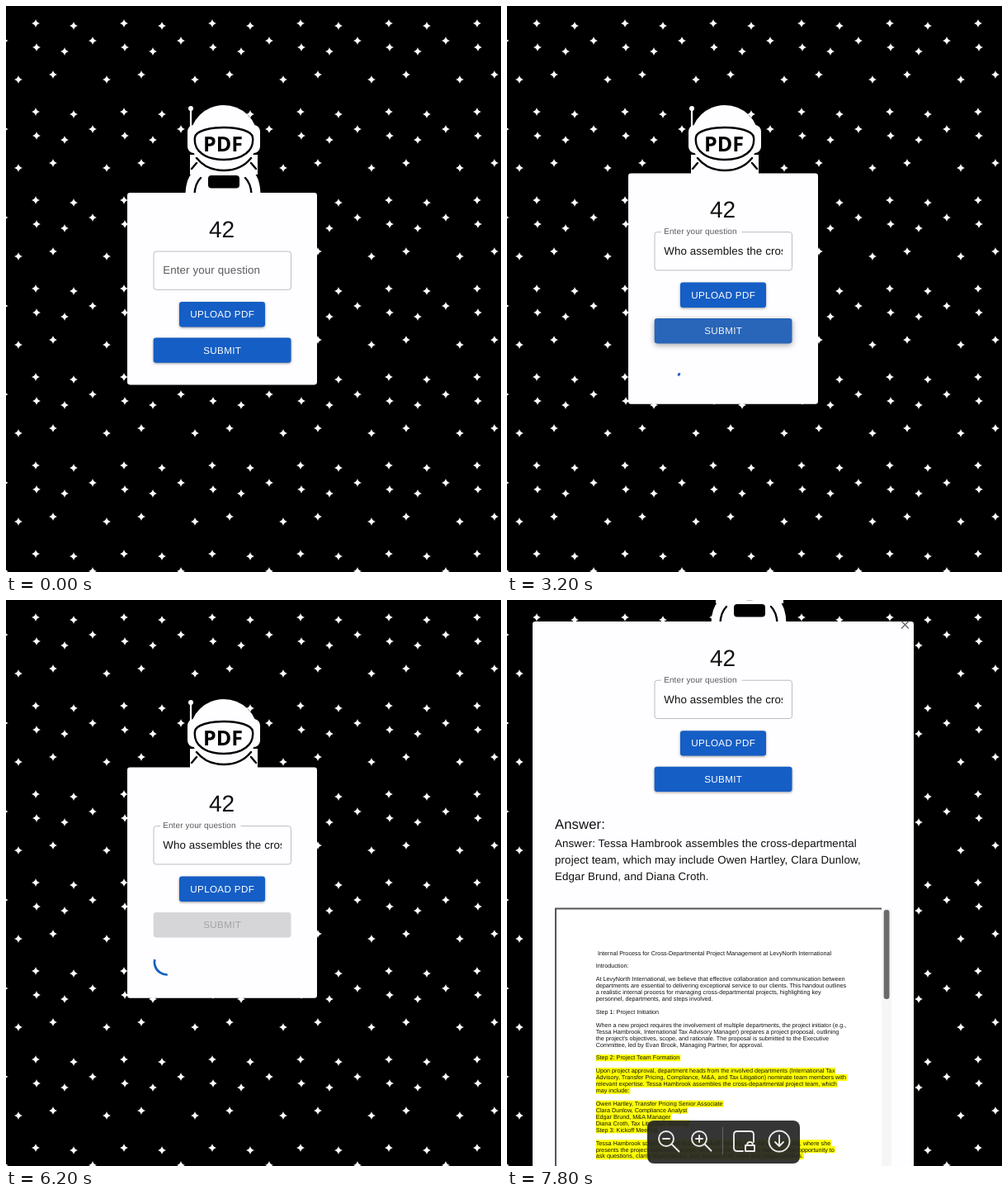
An HTML page that plays this animation: 600x685 px, repeating every 8 s.

```html
<!DOCTYPE html>
<html lang="en">
<head>
<meta charset="utf-8">
<title>42</title>
<style>
  html, body { margin: 0; width: 100%; height: 100%; overflow: hidden; background: #000; }
  svg { display: block; width: 600px; height: 685px; }
  text { font-family: "Liberation Sans", Arial, sans-serif; white-space: pre; text-rendering: geometricPrecision; }
  .body { font-size: 13.33px; letter-spacing: .125px; fill: #111; }
  .button { font-size: 11.67px; letter-spacing: .333px; text-anchor: middle; fill: #fff; }
  .doc { font-size: 7.24px; fill: #111; }
  .line { fill: none; stroke: #000; stroke-width: 2.4; stroke-linecap: round; }
  #upload { filter: drop-shadow(0 1.5px 1.5px rgba(0,0,0,.4)); }
  #hud .icon { fill: none; stroke: #e8e8e8; stroke-width: 1.9; stroke-linecap: round; stroke-linejoin: round; }
</style>
</head>
<body>
<svg viewBox="0 0 600 685">
  <defs><clipPath id="inputClip"><rect x="189.5" y="305" width="144.5" height="30"/></clipPath></defs>
  <rect width="600" height="685"/>
  <path id="stars" fill="#fff"/>

  <g id="astronaut" fill="#fefdff">
    <path d="M223 180h82v24h-82z"/>
    <path d="M217.5 228Q218 206 230 198L240 190H287L297 198Q308 206 308.500 228Z"/>
    <path class="line" d="M231 190L225 197M297 190L303 197" stroke-width="2"/>
    <path class="line" d="M236 208Q229 215 228.500 228M290 208Q297 215 297.500 228"/>
    <rect x="245" y="205" width="38" height="15.500" rx="4" fill="#000"/>
    <path d="M224 124V152" stroke="#fefdff" stroke-width="2.200"/>
    <circle cx="224" cy="124" r="3"/>
    <rect x="220" y="144" width="88" height="34" rx="8"/>
    <ellipse cx="264" cy="160" rx="41" ry="40"/>
    <path class="line" d="M231 184Q243 199 264 199T297 184"/>
    <path class="line" d="M229 159C231 143 297 143 299 159C301 175 287 186 264 186S227 175 229 159Z"/>
    <text x="263" y="175.500" font-size="25" font-weight="700" text-anchor="middle" fill="#000" style="font-family:'Open Sans','Noto Sans',sans-serif">PDF</text>
  </g>

  <rect id="card" rx="3.300" fill="#fefdff"/>

  <g id="form">
    <text x="261.500" y="279.500" font-size="28" text-anchor="middle" fill="#111">42</text>
    <rect id="outline" x="179" y="297" width="166.500" height="46.300" rx="3.300" fill="none"/>
    <rect id="notch" x="187" y="294" height="5" fill="#fefdff"/>
    <text id="label" class="body">Enter your question</text>
    <g clip-path="url(#inputClip)"><text id="value" class="body" y="324.400">Who assembles the cross-departmental project team?</text></g>
    <rect id="caret" y="312" width=".9" height="16" fill="#111"/>
    <path id="ibeam" d="M264.500 322.500Q267 322.500 267 324.500V334Q267 336 264.500 336M269.500 322.500Q267 322.500 267 324.500M267 334Q267 336 269.500 336M265.500 330.500h3" fill="none" stroke="#222"/>
    <g id="upload">
      <rect x="210" y="358" width="104" height="30.400" rx="3.300" fill="#155ec5"/>
      <text class="button" x="262.200" y="377.300">UPLOAD PDF</text>
    </g>
    <g id="submit">
      <rect id="submitBox" x="178.700" y="401.500" width="166.800" height="30.300" rx="3.300"/>
      <text id="submitText" class="button" x="262.200" y="420.700">SUBMIT</text>
    </g>
    <circle id="spinner" r="20.200" fill="none" stroke="#1561be" stroke-width="3.600"/>
  </g>

  <g id="result">
    <path d="M478 25.500l9 9m0-9l-9 9" stroke="#666" stroke-width="1.400"/>
    <text x="58" y="277" font-size="16.670" letter-spacing=".125" fill="#111">Answer:</text>
    <text class="body" x="58" y="299.300">Answer: Tessa Hambrook assembles the cross-departmental</text>
    <text class="body" x="58" y="319.300">project team, which may include Owen Hartley, Clara Dunlow,</text>
    <text class="body" x="58" y="339.300">Edgar Brund, and Diana Croth.</text>
    <rect x="59" y="373" width="407" height="312" fill="#fff"/>
    <rect x="454" y="373" width="12" height="312" fill="#f7f6f7"/>
    <path d="M454 373.500H59V685" fill="none" stroke="#555" stroke-width="2"/>
    <rect x="456.700" y="375" width="6.800" height="108" rx="3" fill="#6a6a6a"/>
    <g id="page"></g>
    <g id="hud">
      <rect x="170" y="630" width="185" height="52" rx="8" fill="#262626" fill-opacity=".93"/>
      <path d="M261.500 638V671" stroke="#666"/>
      <g id="zoomOut" class="icon"><circle cx="193" cy="652" r="9"/><path d="M199.500 658.500l9 9M189 652h8"/></g>
      <g class="icon"><circle cx="233" cy="652" r="9"/><path d="M239.500 658.500l8 8M229 652h8M233 648v8"/></g>
      <path class="icon" d="M286 667H279Q275 667 275 663V647Q275 643 279 643H295Q299 643 299 647V656M289 667V660H300V667ZM291 660Q291 656 294.500 656T298 660"/>
      <g class="icon"><circle cx="330" cy="655" r="12.500"/><path d="M330 648v13m-5-5l5 5l5-5"/></g>
    </g>
  </g>
</svg>
<script>
const LOOP = 8000, STEP = 100;
const PASTE = 2000, BLUR = 3000, SPIN = 3117, BUSY = 3200, DONE = 7500;
const BLUE = [21, 94, 197], HOVER = [21, 88, 180], GREY = [214, 213, 215];
const svgNS = 'http://www.w3.org/2000/svg';
const $ = id => document.getElementById(id);
const set = (id, attrs) => { for (const k in attrs) $(id).setAttribute(k, attrs[k]); };
const show = (id, on) => { $(id).style.visibility = on ? 'visible' : 'hidden'; };
const ease = x => { x = Math.min(1, Math.max(0, x)); return x * x * (3 - 2 * x); };
const lerp = (a, b, k) => a + (b - a) * k;
const mix = (a, b, k) => a.map((v, i) => lerp(v, b[i], k));
const rgb = c => `rgb(${c.map(Math.round)})`;

function buildStars() {
  const tile = [[36, 21], [82, 24], [105, 42], [37, 50], [71, 55], [57, 83], [15, 89]];
  let d = '';
  for (let x = -107; x < 600; x += 107)
    for (let y = 0; y < 685; y += 107)
      for (const [sx, sy] of tile)
        d += `M${x + sx} ${y + sy - 5}q1 4 5 5q-4 1-5 5q-1-4-5-5q4-1 5-5`;
  set('stars', { d });
}

// Blank entries are empty lines; everything from "Step 2" on is highlighted.
function buildPage() {
  const lines = `Internal Process for Cross-Departmental Project Management at LevyNorth International

Introduction:

At LevyNorth International, we believe that effective collaboration and communication between
departments are essential to delivering exceptional service to our clients. This handout outlines
a realistic internal process for managing cross-departmental projects, highlighting key
personnel, departments, and steps involved.

Step 1: Project Initiation

When a new project requires the involvement of multiple departments, the project initiator (e.g.,
Tessa Hambrook, International Tax Advisory Manager) prepares a project proposal, outlining
the project's objectives, scope, and rationale. The proposal is submitted to the Executive
Committee, led by Evan Brook, Managing Partner, for approval.

Step 2: Project Team Formation

Upon project approval, department heads from the involved departments (International Tax
Advisory, Transfer Pricing, Compliance, M&A, and Tax Litigation) nominate team members with
relevant expertise. Tessa Hambrook assembles the cross-departmental project team, which
may include:

Owen Hartley, Transfer Pricing Senior Associate
Clara Dunlow, Compliance Analyst
Edgar Brund, M&A Manager
Diana Croth, Tax Litigation Attorney
Step 3: Kickoff Meeting

Tessa Hambrook schedules and leads a kickoff meeting with the project team, where she
presents the project objectives, scope, and timeline, and gives members the opportunity to
ask questions, clarify expectations, and discuss their roles and responsibilities.`.split('\n');
  const add = (name, attrs) => {
    const el = $('page').appendChild(document.createElementNS(svgNS, name));
    for (const k in attrs) el.setAttribute(k, attrs[k]);
    return el;
  };
  lines.forEach((line, i) => {
    if (!line) return;
    const x = i ? 107.7 : 110, y = 429.6 + 7.93 * i;
    const text = add('text', { class: 'doc', x, y });
    text.textContent = line;
    if (i < 16) return;
    const mark = add('rect', { x, y: y - 6.3, width: text.getComputedTextLength() + 1, height: 8, fill: '#ff0' });
    $('page').insertBefore(mark, text);
  });
}

function drawLayout(t) {
  const done = t >= DONE, busy = t >= BUSY && !done;
  set('card', done ? { x: 31, y: 26, width: 462, height: 670 }
    : busy ? { x: 147, y: 202.6, width: 230, height: 279.2 }
    : { x: 147, y: 226, width: 230, height: 232.4 });
  set('form', { transform: `translate(0 ${done ? -199.8 : busy ? -23.4 : 0})` });
  set('astronaut', { transform: done ? 'translate(30 -200)' : '' });
  show('result', done);
  show('page', t >= 7700);
  show('hud', t >= 7700);
  show('spinner', busy);
}

function drawField(t) {
  const focused = t >= 1100 && t < BLUR, lift = ease((t - 1000) / 200);
  set('outline', { stroke: focused ? '#1561be' : '#bdbcbe', 'stroke-width': focused ? 1.7 : 1 });
  set('notch', { width: 97.5 * lift });
  set('label', { transform: `translate(190.2 ${lerp(324.2, 299.6, lift)}) scale(${lerp(1, .75, lift)})` });
  $('label').style.fill = focused ? '#1561be' : '#5c5c5c';
  const typing = t < BLUR;
  set('value', { x: typing ? 332.6 : 190.2, 'text-anchor': typing ? 'end' : 'start' });
  show('value', t >= PASTE);
  set('caret', { x: t < PASTE ? 190 : 332 });
  show('caret', t === 1600 || t >= PASTE && t < 2500);
  show('ibeam', t >= 2300 && t < 2500);
}

function drawSubmit(t) {
  const hover = t < DONE ? ease((t - 2750) / 250) : 0;
  const off = ease((t - 3150) / 250) - ease((t - 7450) / 250);
  set('submitBox', { fill: rgb(mix(mix(BLUE, HOVER, hover), GREY, off)) });
  $('submitText').style.fill = rgb(mix([255, 255, 255], [163, 162, 164], off));
  const shade = .4 * (1 - off);
  $('submit').style.filter = `drop-shadow(0 ${1.5 + hover}px ${1.5 + 2 * hover}px rgba(0,0,0,${shade}))`;
}

function drawSpinner(t) {
  const p = Math.max(0, t - SPIN) % 1400 / 1400;
  const grow = ease(p * 2), slide = ease(p * 2 - 1);
  set('spinner', {
    transform: `translate(195.2 461.600) scale(.7576) rotate(${360 * p})`,
    'stroke-dasharray': `${lerp(1, 100, grow)} 200`,
    'stroke-dashoffset': -15 * grow - 110 * slide
  });
}

function draw() {
  const t = Math.floor((performance.now() - start) % LOOP / STEP) * STEP;
  drawLayout(t);
  drawField(t);
  drawSubmit(t);
  drawSpinner(t);
  requestAnimationFrame(draw);
}

buildStars();
buildPage();
const start = performance.now();
draw();
</script>
</body>
</html>
```
